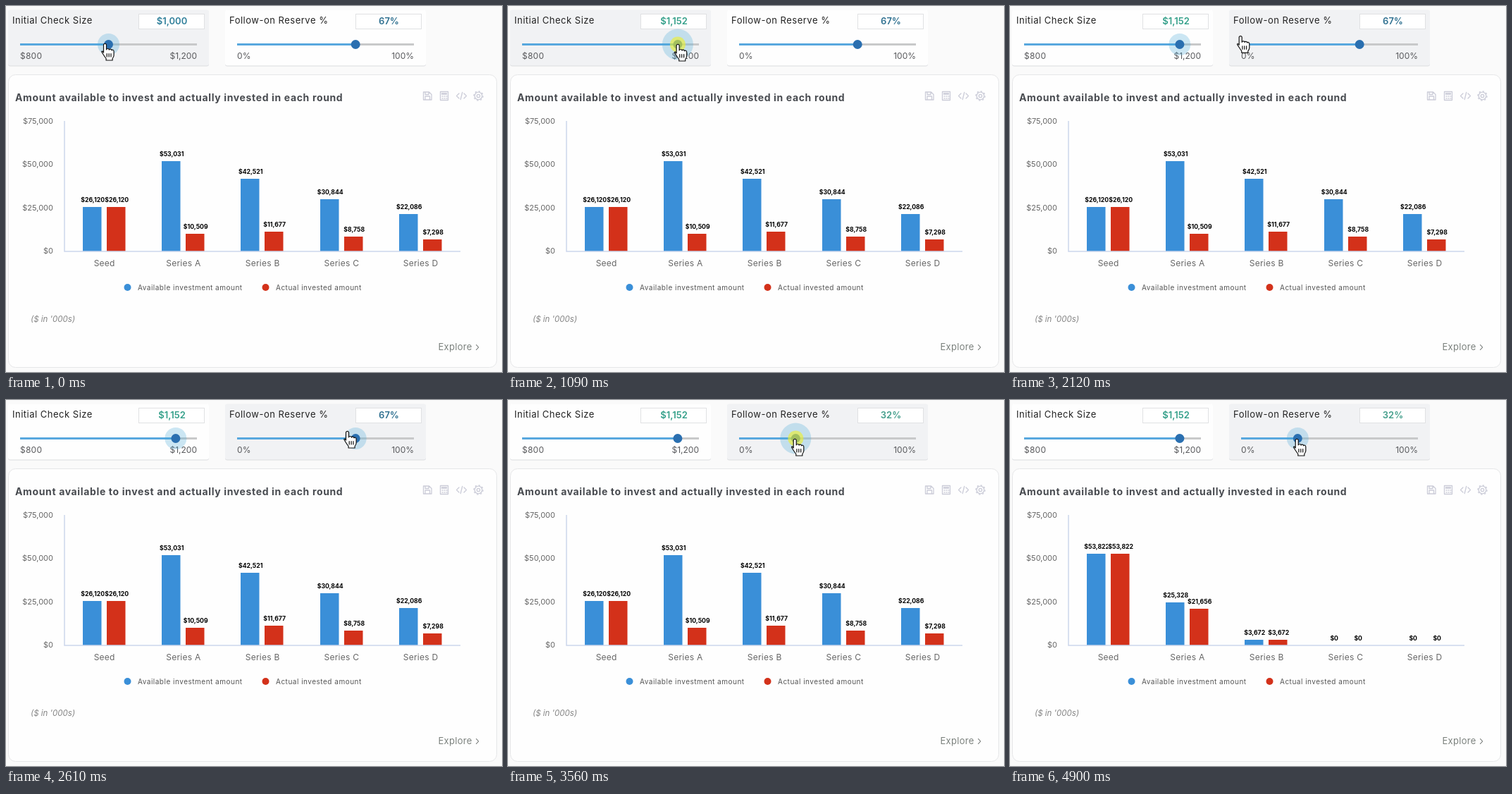
An HTML page that plays this animation: 704 px wide and 519 px high, repeating every 5.69 s.

```html
<!DOCTYPE html>
<html lang="en">
<head>
<meta charset="utf-8">
<title>Investment model</title>
<style>
  html, body { margin: 0; width: 100%; height: 100%; overflow: hidden; background: #fafafa; }
  svg { display: block; width: 100%; height: 100%; font-family: Inter, "Open Sans", sans-serif; }
  .line { fill: none; stroke-linecap: round; stroke-linejoin: round; }
  .value-label { paint-order: stroke; stroke: #fff; stroke-width: 2px; }
</style>
</head>
<body>
<svg id="stage" viewBox="0 0 704 519" xmlns="http://www.w3.org/2000/svg"></svg>
<script>
const LOOP = 5690, STEP = 70;
const BASE = 348, SCALE = 0.00243;
const BLUE = '#3a8fd8', RED = '#d3311a';
const rounds = ['Seed', 'Series A', 'Series B', 'Series C', 'Series D'];
const before = [[26120, 26120], [53031, 10509], [42521, 11677], [30844, 8758], [22086, 7298]];
const after = [[53822, 53822], [25328, 21656], [3672, 3672], [0, 0], [0, 0]];

// Key points: time, then one or more values
const cursorKeys = [[0, 143, 53], [350, 143, 53], [700, 183.3, 54], [910, 233.5, 54], [1050, 243.6, 54],
  [1260, 243.6, 54], [1470, 244, 47], [1540, 246, 47], [1790, 304, 42], [2020, 304, 42],
  [2590, 487, 44], [2870, 487, 44], [2990, 487.5, 54], [3490, 409.7, 55]];
const checkKeys = [[209, 1000], [210, 992], [350, 992], [700, 1056], [910, 1136], [1050, 1152]];
const reserveKeys = [[2989, 67], [2990, 63], [3490, 32]];

const money = n => '$' + Math.round(n).toLocaleString('en-US');
const between = (t, a, b) => t >= a && t < b;

function follow(keys, t) {
  const next = keys.findIndex(k => k[0] > t);
  if (next < 0) return keys[keys.length - 1].slice(1);
  if (next === 0) return keys[0].slice(1);
  const a = keys[next - 1], b = keys[next];
  const p = (t - a[0]) / (b[0] - a[0]);
  return a.slice(1).map((v, i) => v + (b[i + 1] - v) * p);
}

function text(x, y, size, fill, content, { anchor = 'start', weight = 400, space = 0, more = '' } = {}) {
  return `<text x="${x}" y="${y}" font-size="${size}" fill="${fill}" text-anchor="${anchor}"
    font-weight="${weight}" letter-spacing="${space}" ${more}>${content}</text>`;
}

function sliderCard(id, x, title, low, high) {
  const left = x + 17, right = x + 268;
  return `
    <rect x="${x}" y="6.5" width="285" height="79" rx="3" fill="#dcdde0"/>
    <rect id="${id}Card" x="${x}" y="5.5" width="285" height="79" rx="3"/>
    ${text(x + 6, 25, 13, '#222', title, { space: 0.5 })}
    <rect x="${x + 185.5}" y="11.5" width="93" height="21" fill="#fff" stroke="#e0e1e3"/>
    ${text(x + 232.5, 26, 13, '', '', { anchor: 'middle', weight: 600, more: `id="${id}Value"` })}
    ${text(left, 75, 12, '#58595c', low, { space: 0.25 })}
    ${text(right, 75, 12, '#58595c', high, { anchor: 'end' })}
    <path d="M${left} 54.5H${right}" stroke="#c8c9ca" stroke-width="3"/>
    <path id="${id}Track" stroke="#58a8de" stroke-width="3"/>
    <g id="${id}Thumb">
      <circle id="${id}Halo" fill="#48a8d8" fill-opacity=".28"/>
      <circle r="6.5" fill="#2a6fb0"/>
      <circle id="${id}Press" r="11" fill="#eef02c" fill-opacity=".62"/>
    </g>`;
}

const toolIcons = `
  <g id="tools" class="line" stroke="#cbccd8" stroke-width="1.3">
    <path d="M592.5 122h8l3.5 3.5v7.5h-11.5zM595 122v3.5h5v-3.5M595 133v-5h6.5v5"/>
    <path d="M616.5 121.5h11v12h-11zM618.5 124h7v1h-7zM619 128h1m2 0h1m2 0h1M619 131h1m2 0h1m2 0h1"/>
    <path d="M643 124l-3.5 3.5 3.5 3.5M650 124l3.5 3.5-3.5 3.5M647.7 122.5l-2.5 10"/>
    <circle cx="670.5" cy="127.5" r="2.2"/>
    <circle cx="670.5" cy="127.5" r="5.3"/>
    <circle cx="670.5" cy="127.5" r="6.6" stroke-dasharray="2.3 2.88" stroke-linecap="butt"/>
  </g>`;

const axis = [75000, 50000, 25000, 0].map((v, i) =>
  text(67, 167 + i * 61.3, 11, '#666', money(v), { anchor: 'end' })).join('');
const categories = rounds.map((name, i) =>
  text(139.7 + i * 112.2, 369, 12, '#666', name, { anchor: 'middle', space: 0.25 })).join('');

const bars = [], barMarkup = [];
rounds.forEach((_, round) => [BLUE, RED].forEach((color, series) => {
  const x = Math.round(109 + round * 112.2) + series * 34, id = `bar${round}${series}`;
  bars.push({ id, from: before[round][series], to: after[round][series] });
  barMarkup.push(`<rect id="${id}" x="${x}" width="26.5" fill="${color}"/>` +
    text(x + 14.2, 0, 8.7, '#000', '', { anchor: 'middle', weight: 700, more: `id="${id}Label" class="value-label"` }));
}));

const stage = document.getElementById('stage');
stage.innerHTML = `
  ${sliderCard('check', 3, 'Initial Check Size', '$800', '$1,200')}
  ${sliderCard('reserve', 311, 'Follow-on Reserve %', '0%', '100%')}
  <rect x="3.5" y="97.5" width="693" height="415" rx="10" fill="#fefefe" stroke="#e6e7e8"/>
  ${text(13, 135, 14, '#484b50', 'Amount available to invest and actually invested in each round', { weight: 700, space: 0.64 })}
  ${toolIcons}
  <g id="loader" fill="#48b5a8">
    <circle id="pulse" cx="672" cy="130" fill-opacity=".35"/>
    <circle cx="672" cy="130" r="5.3"/>
  </g>
  <g id="chart">
    ${axis}${categories}${barMarkup.join('')}
    <path d="M83 163V348H645" fill="none" stroke="#ccd6eb" stroke-width="1.5"/>
    <circle cx="172.5" cy="399" r="5" fill="${BLUE}"/>
    ${text(187, 403, 10, '#555', 'Available investment amount', { space: 0.5 })}
    <circle cx="368.5" cy="399" r="5" fill="${RED}"/>
    ${text(383, 403, 10, '#555', 'Actual invested amount', { space: 0.5 })}
    ${text(35, 448, 11.5, '#858585', "($ in '000s)", { more: 'font-style="italic"' })}
  </g>
  ${text(613.5, 488, 13, '#7b817d', 'Explore', { space: 0.3 })}
  <path class="line" d="M667.5 480.5l3.2 3.5-3.2 3.5" stroke="#6c716e" stroke-width="1.1"/>
  <g id="cursor" class="line" stroke="#111" stroke-width="1.2">
    <path fill="#fff" d="M-4.5 13V2.3a2 2 0 0 1 4 0V9q.3-1.6 2-1.5t1.9 1.6q.4-1.2 1.9-1t1.8 1.7
      q.5-.9 1.7-.5t1.3 2V17q0 2-2 4.5V24h-9V21.5q-2-2.5-4.5-6.5t-1.5-3.5q.9-1 2.4 1.5Z"/>
    <path d="M.2 14.5v4.5m2.9-4.5v4.5m2.9-4.5v4.5"/>
  </g>`;

const el = Object.fromEntries([...stage.querySelectorAll('[id]')].map(node => [node.id, node]));
const set = (id, attributes) => {
  for (const name in attributes) el[id].setAttribute(name, attributes[name]);
};
const show = (id, visible) => set(id, { visibility: visible ? 'visible' : 'hidden' });

function drawSlider(id, left, fraction, label, color, { hover, focus, press }) {
  const x = left + 251 * fraction;
  set(id + 'Card', { fill: hover ? '#f1f2f4' : '#fefefe' });
  set(id + 'Track', { d: `M${left} 54.5H${x}` });
  set(id + 'Thumb', { transform: `translate(${x} 54.5)` });
  set(id + 'Halo', { r: press ? 22 : focus ? 15.5 : 0 });
  set(id + 'Value', { fill: color });
  el[id + 'Value'].textContent = label;
  show(id + 'Press', press);
}

function draw(time) {
  const t = Math.floor(time / STEP) * STEP;
  const [x, y] = follow(cursorKeys, t);
  set('cursor', { transform: `translate(${x} ${y})` });

  const [check] = follow(checkKeys, t);
  drawSlider('check', 20, (check - 800) / 400, money(check), t < 210 ? '#31809b' : '#35a08a', {
    hover: x < 289, focus: t < 2920, press: between(t, 350, 1190)
  });
  const [reserve] = follow(reserveKeys, t);
  drawSlider('reserve', 328, reserve / 100, Math.round(reserve) + '%', t < 2990 ? '#2f7090' : '#459f8c', {
    hover: x > 311, focus: x > 480 || t > 2900, press: between(t, 2990, 3680)
  });

  const start = t < 3000 ? 1400 : 3770;
  const loading = between(t, 1400, 2020) || between(t, 3770, 4550);
  show('loader', loading);
  show('tools', !loading);
  // The page stalls shortly before each redraw, so the pulse pauses
  const pulseTime = Math.min(t, start === 1400 ? 1790 : 4340) - start;
  set('pulse', { r: 5.5 + 2.5 * (1 - Math.cos(Math.PI * pulseTime / 600)) });
  for (const label of el.chart.querySelectorAll('text')) label.setAttribute('opacity', loading ? 0.9 : 1);

  const progress = Math.max(0, Math.min(1, (t - 4550) / 350));
  const eased = 1 - (1 - progress) ** 2;
  for (const { id, from, to } of bars) {
    const top = Math.ceil(BASE - (from + (to - from) * eased) * SCALE);
    set(id, { y: top, height: BASE - top });
    set(id + 'Label', { y: top - 7 });
    el[id + 'Label'].textContent = money(progress > 0 ? to : from);
  }
}

const began = performance.now();
function tick() {
  draw((performance.now() - began) % LOOP);
  requestAnimationFrame(tick);
}
tick();
</script>
</body>
</html>
```
